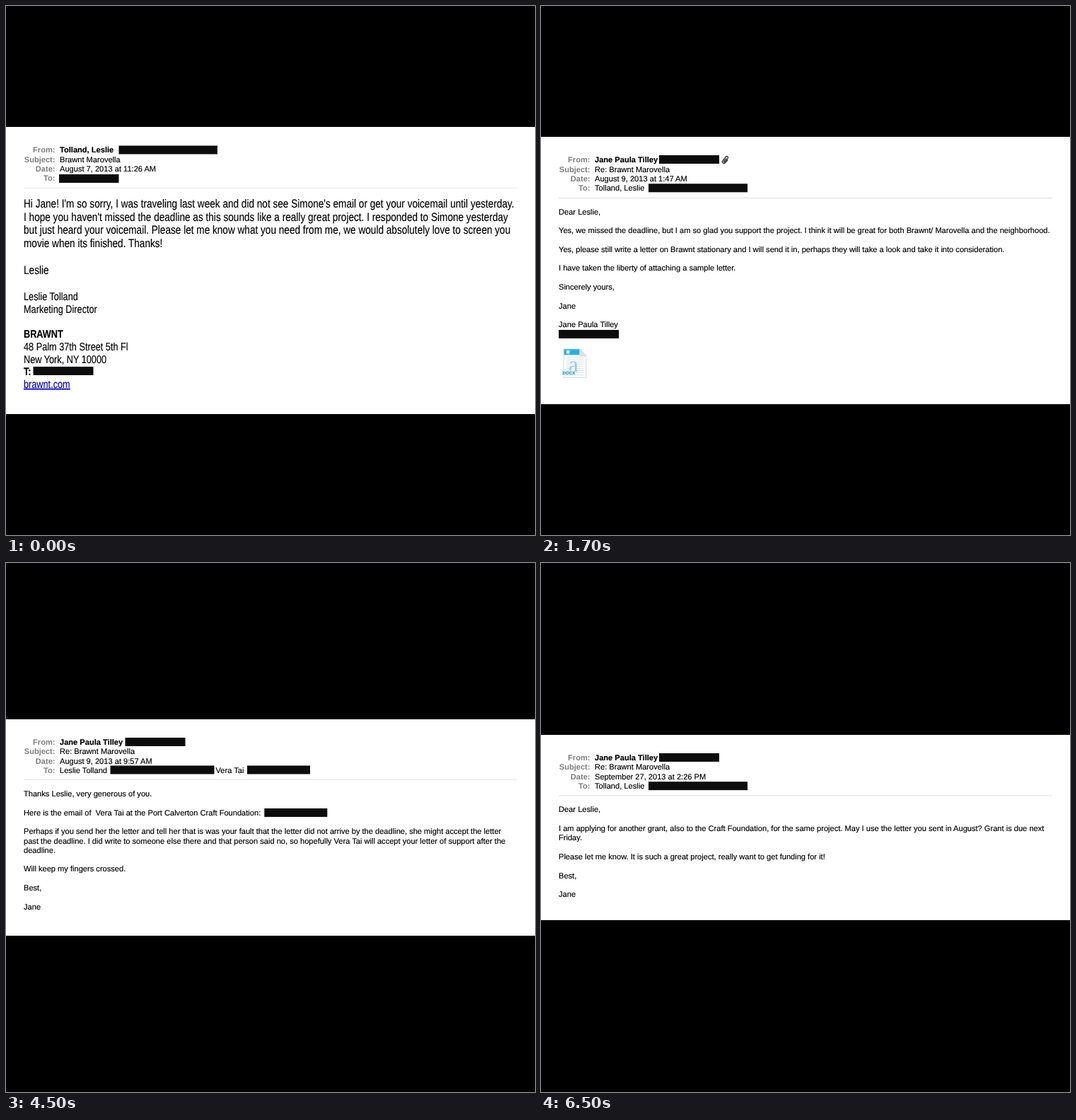
These frames come from a looping animation (748 by 748 pixels, 8 s). An HTML page:

```html
<!DOCTYPE html>
<html lang="en">
<head>
<meta charset="utf-8">
<title>Email thread</title>
<style>
html, body { margin: 0; width: 100%; height: 100%; overflow: hidden; background: #000; }
svg { display: block; width: 100vw; height: 100vh; }
text {
  font-family: "Liberation Sans", Arial, sans-serif;
  white-space: pre;
  text-rendering: geometricPrecision;
}
.b { font-weight: bold; }
.i { font-style: italic; }
.label { font-weight: bold; fill: #7d7d7d; text-anchor: end; }
.link { fill: #0000ee; text-decoration: underline; }
.soft { fill: #2f5cb0; stroke: none; }
.mail { stroke: #000; stroke-width: .15px; }
.print { stroke: #222; stroke-width: .25px; }
.footer text { font-family: Roboto, sans-serif; letter-spacing: 1.5px; }
.serif { font-family: "Liberation Serif", serif; }
</style>
</head>
<body>
<svg id="stage" viewBox="0 0 748 748"></svg>
<script>
const SIZE = 11.1, STEP = 13.3, NARROW = 0.82;
const starts = [0, 500, 2500, 4500, 6500], LOOP = 8000;

const rect = (x, y, w, h, fill = '#0c0c0c') =>
  `<rect x="${x}" y="${y}" width="${w}" height="${h}" fill="${fill}"/>`;
const rule = (x1, x2, y, color = '#dedede') => rect(x1, y, x2 - x1, 1, color);
const span = (cls, s) => `<tspan class="${cls}">${s}</tspan>`;

const text = (x, y, size, s, cls = '', fill = '#000') =>
  `<text x="${x}" y="${y}" font-size="${size}" class="${cls}" fill="${fill}">${s}</text>`;

// Empty strings leave a blank line.
const lines = (x, y, list, size = SIZE, step = STEP, cls = 'mail', fill) =>
  list.map((s, i) => s && text(x, y + i * step, size, s, cls, fill)).join('');

const narrow = (x, y, list, size, step, cls, fill) =>
  `<g transform="translate(${x} ${y}) scale(${NARROW} 1)">${lines(0, 0, list, size, step, cls, fill)}</g>`;

const printed = (y, list) => lines(198.3, y, list, 8.66, 9.98, 'print', '#222');

const header = (y, from, subject, date, to, right = 69.5, left = 76, size = SIZE, step = STEP) =>
  ['From:', 'Subject:', 'Date:', 'To:'].map((s, i) => text(right, y + i * step, size, s, 'label')).join('') +
  lines(left, y, [span('b', from), subject, date, to], size, step);

const clip = (x, y, k = 1) =>
  `<path transform="translate(${x} ${y}) rotate(40) scale(${k})" fill="none" stroke="#222" stroke-width="1.2"
    d="M2.4-2V3.4a2.4 2.4 0 0 1-4.8 0V-3.6a1.7 1.7 0 0 1 3.4 0V3a.8 .8 0 0 1-1.6 0V-2"/>`;

const sheet = (top, bottom) => rect(0, top, 748, bottom - top, '#fff');

const docIcon = () => {
  let s = '<path d="M32 485H55L64 495V525.5H32Z" fill="#f8fafb" stroke="#c9d0d4" stroke-width=".7"/>';
  for (let y = 497; y < 523; y += 3) s += rect(36, y, 24, 0.6, '#cfdbe2');
  return s + rect(32.5, 485.3, 22, 8, '#26b2e4') + rect(36, 487, 4.5, 4.5, '#fff') +
    '<path d="M55 485V495H64Z" fill="#dfe4e7" stroke="#bcc4c8" stroke-width=".5"/>' +
    text(39, 517, 31, 'a', 'serif', '#8fcbe5') +
    rect(29, 515, 19, 7.5, '#dceff8') + text(30.5, 521.2, 6.2, 'DOCX', 'b', '#2588b5');
};

const footer = () => {
  const ink = '#edf2f2';
  const parts = [[139, '48 P 37TH STREET, 5TH FLOOR'], [308, 'NEW YORK,NY'], [393, '10000'],
    [440, '212.555.0100'], [526, 'BRAWNT.COM']];
  const dots = [299.5, 384.5, 431, 517.5];
  return '<g class="footer">' + rect(131, 698, 468.5, 26, '#cad4d5') +
    parts.map(([x, s]) => text(x, 716.3, 8, s, '', ink)).join('') +
    dots.map(x => `<circle cx="${x}" cy="713.3" r="1.4" fill="${ink}"/>`).join('') + '</g>';
};

const scenes = [
  sheet(171, 577) +
  header(207.2, 'Tolland, Leslie', 'Brawnt Marovella', 'August 7, 2013 at 11:26 AM', '') +
  rect(159.5, 197.5, 139.5, 12) + rect(75, 238, 84.5, 12) + rule(25, 722, 257, '#e8e8e8') +
  narrow(25, 285, [
    "Hi Jane! I'm so sorry, I was traveling last week and did not see Simone's email or get your voicemail until yesterday.",
    "I hope you haven't missed the deadline as this sounds like a really great project. I responded to Simone yesterday",
    'but just heard your voicemail. Please let me know what you need from me, we would absolutely love to screen you',
    'movie when its finished. Thanks!', '', 'Leslie'], 16.6, 18.7) +
  narrow(25, 416, ['Leslie Tolland', 'Marketing Director', '', span('b', 'BRAWNT'),
    '48 Palm 37th Street 5th Fl', 'New York, NY 10000', span('b', 'T:'), span('link', 'brawnt.com')], 15.5, 17.7) +
  rect(38.5, 510, 85, 12),

  sheet(185, 563) +
  header(221.2, 'Jane Paula Tilley', 'Re: Brawnt Marovella', 'August 9, 2013 at 1:47 AM', 'Tolland, Leslie') +
  rect(167, 211, 85, 12) + clip(261, 217.5) + rect(152, 251.3, 140, 12) + rule(25, 723, 271) +
  lines(25, 294.5, ['Dear Leslie,', '',
    'Yes, we missed the deadline, but I am so glad you support the project. I think it will be great for both Brawnt/ Marovella and the neighborhood.', '',
    'Yes, please still write a letter on Brawnt stationary and I will send it in, perhaps they will take a look and take it into consideration.', '',
    'I have taken the liberty of attaching a sample letter.', '',
    'Sincerely yours,', '', 'Jane', '', 'Jane Paula Tilley']) +
  rect(25, 458, 85, 12) + docIcon(),

  rect(108, 0, 532, 748, '#fff') +
  header(23.4, 'Tolland, Leslie', 'Re: Brawnt Marovella', 'August 9, 2013 at 9:33 AM', 'Jane Paula Tilley', 157.5, 162, 7.9, 9.5) +
  rect(222, 16, 99.5, 9) + clip(330.5, 20.8, 0.72) + rect(224, 44.5, 60.5, 8.7) + rule(126, 621, 59, '#e3e3e3') +
  narrow(126, 91.5, [
    "Hi Jane! I'm so sorry!!! I'm mailing the letter today – I'm happy to speak to anyone and explain it was my fault.",
    'Attached is the letter for your reference.'], 11.77, 13.3) +
  rule(131, 599.5, 151.5, '#c8c8c8') + '<circle cx="176" cy="143" r="23" fill="#e2593a"/>' +
  narrow(198, 223, ['Leslie Tolland', 'Marketing Director: ' + span('b', 'BRAWNT'),
    '48 Palm 37th Street 5th Fl', 'New York, NY 10000', span('b', 'T:'), span('link soft', 'brawnt.com')], 11.07, 12.6, 'print', '#222') +
  rect(209, 264.5, 60.5, 8.7) +
  text(452.8, 306.2, 8.66, 'August 2, 2013', 'print', '#222') +
  printed(326.2, ['The Port Calverton Craft Foundation', 'Shared Lantern Grants Program',
    '67 Oak Fern Avenue, Suite 318', 'PC CA. 94000', '', '', '', 'Dear Grant panel,', '',
    `I am writing in support of Jane Paula Tilley's proposed project, ${span('i', 'Marovella')}, an evening`,
    'performance of film and exercise, based on research into the history of Cobbler Hill as a',
    'neighborhood and its landmark cinema the Marovella Theater that is now a Brawnt gym.', '',
    'We at Brawnt are very excited by this neighborhood project and will work collaboratively',
    'with Jane to engage to facilitate a public performative event at Brawnt, an evening of',
    'history/exercise and film screenings, at a date in to be worked out in future.', '',
    'We are interested in working with Jane to host the project but Brawnt does not commit',
    'to any funds for the execution and running of the project.', '',
    'We hope the Craft Foundation will support the project.', '', '', 'Sincerely yours,']) +
  printed(615.3, ['Leslie Tolland', 'Marketing Director', 'Brawnt, LLC']) +
  footer(),

  sheet(221, 527) +
  header(257, 'Jane Paula Tilley', 'Re: Brawnt Marovella', 'August 9, 2013 at 9:57 AM', 'Leslie Tolland') +
  rect(168.5, 247, 85, 12) + rect(147.5, 286.5, 147, 12) +
  text(296.5, 296.9, SIZE, 'Vera Tai', 'mail') + rect(341, 286.5, 89, 12) + rule(25, 722, 306, '#e3e3e3') +
  lines(25, 330, ['Thanks Leslie, very generous of you.', '',
    'Here is the email of  Vera Tai at the Port Calverton Craft Foundation:', '',
    'Perhaps if you send her the letter and tell her that is was your fault that the letter did not arrive by the deadline, she might accept the letter',
    'past the deadline. I did write to someone else there and that person said no, so hopefully Vera Tai will accept your letter of support after the',
    'deadline.', '', 'Will keep my fingers crossed.', '', 'Best,', '', 'Jane']) +
  rect(365.3, 347, 89, 12),

  sheet(243, 505) +
  header(279, 'Jane Paula Tilley', 'Re: Brawnt Marovella', 'September 27, 2013 at 2:26 PM', 'Tolland, Leslie') +
  rect(167, 269, 85, 12) + rect(152, 309.2, 140, 12) + rule(25, 722, 328.5) +
  lines(25, 352.4, ['Dear Leslie,', '',
    'I am applying for another grant, also to the Craft Foundation, for the same project. May I use the letter you sent in August? Grant is due next',
    'Friday.', '', 'Please let me know. It is such a great project, really want to get funding for it!', '',
    'Best,', '', 'Jane'])
];

const stage = document.getElementById('stage');
stage.innerHTML = scenes.map(s => `<g display="none">${s}</g>`).join('');
const groups = [...stage.children];
const begin = performance.now();

function draw(now) {
  const t = Math.max(0, now - begin) % LOOP;
  const current = starts.filter(s => s <= t).length - 1;
  groups.forEach((g, i) => g.setAttribute('display', i === current ? 'inline' : 'none'));
  requestAnimationFrame(draw);
}
draw(begin);
</script>
</body>
</html>
```
